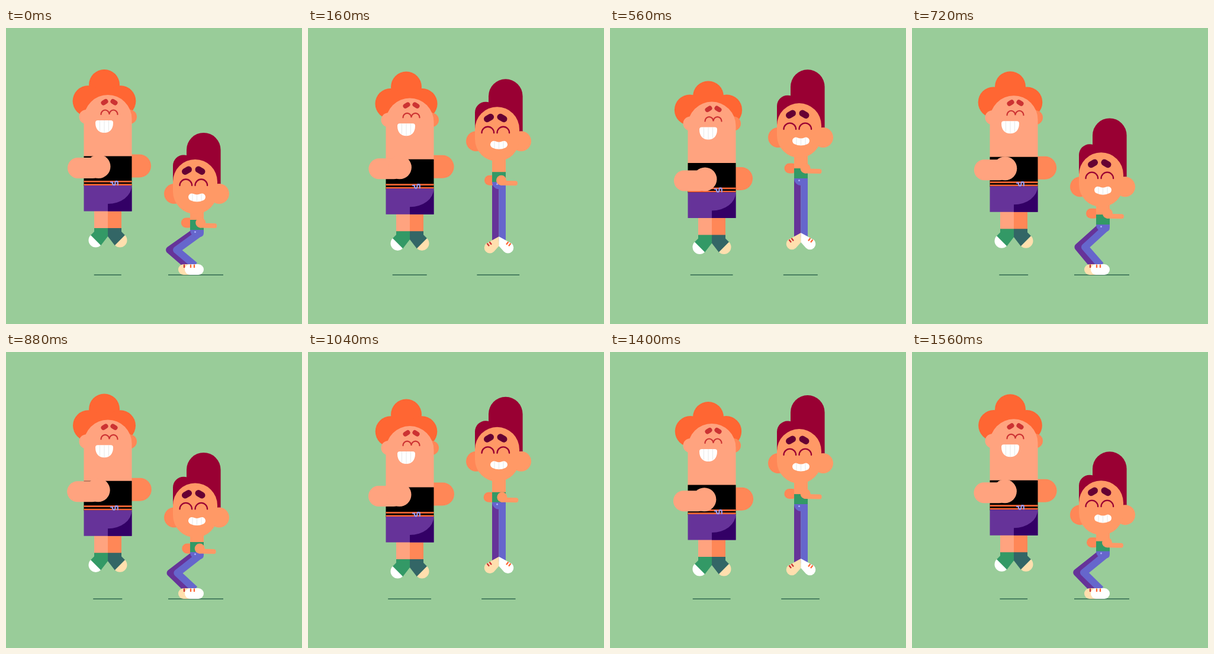
Animation of 500 by 500 pixels, one loop 1600 ms. Source, as an HTML page without scripts:

```html
<!DOCTYPE html>
<html lang="en">
<head>
<meta charset="utf-8">
<title>Jumping friends</title>
<style>
  @property --air  { syntax: "<number>"; inherits: true; initial-value: 0; }
  @property --down { syntax: "<number>"; inherits: true; initial-value: 0; }
  @property --sq   { syntax: "<number>"; inherits: true; initial-value: 0; }
  @property --nod  { syntax: "<number>"; inherits: true; initial-value: 0; }
  @property --lag  { syntax: "<number>"; inherits: true; initial-value: 0; }
  @property --arm  { syntax: "<number>"; inherits: true; initial-value: 0; }

  html, body { margin: 0; width: 100%; height: 100%; overflow: hidden; background: #9c9; }
  svg { display: block; width: 500px; height: 500px; }

  .guy {
    --delay: 0s; --base: 0; --sink: 0;
    animation: air .8s infinite, land .8s linear infinite, drag .8s linear infinite, swing .8s linear infinite;
    animation-delay: var(--delay);
  }
  .big   { --drop: 78; --skin: #ffa37f; --shade: #ff8757; }
  .small { --drop: 83.3; --delay: -.4s; --base: -1.3; --sink: 5; --skin: #f96; --shade: #ff8757; }

  .body { transform: translateY(calc((var(--base) + var(--air) + var(--sq) + var(--down) * var(--drop)) * 1px)); }
  .head { transform: translateY(calc((var(--nod) + var(--down) * var(--sink)) * 1px)); }
  .hair { transform: translate(calc(var(--lag) * var(--dx, 0) * 1px), calc(var(--lag) * var(--dy, 1) * 1px)); }
  .arm  { transform: translate(calc(var(--arm) * var(--dx) * 1px), calc(var(--arm) * 1px)); }
  .flying   { opacity: calc(1 - var(--down)); }
  .standing { opacity: var(--down); }
  .shadow { fill: #0b4434; transform: scaleX(calc(.495 + .024 * var(--air) + .505 * var(--down))); }
  .skin { fill: var(--skin); }
  .shade { fill: var(--shade); }
  .line { fill: none; stroke-linecap: round; }
  .leg { fill: none; stroke-width: 12; stroke-linejoin: round; animation: .8s linear infinite var(--delay); }
  .back { stroke: #639; animation-name: back; }
  .front { stroke: #66c; animation-name: front; }

  /* quadratic hang time around the top of the jump */
  @keyframes air {
    0% { --air: 0; animation-timing-function: cubic-bezier(.333, 0, .667, .333); }
    39.8% { --air: 21; animation-timing-function: step-end; }
    39.81%, 64.8% { --air: 0; animation-timing-function: step-end; }
    64.81% { --air: 16; animation-timing-function: cubic-bezier(.333, .667, .667, 1); }
    100% { --air: 0; }
  }
  @keyframes land {
    0%, 39.8% { --down: 0; --sq: 0; --nod: 0; }
    39.81% { --down: 1; }
    40% { --sq: 0; --nod: 0; }
    45% { --sq: 4.5; --nod: 2.5; }
    50% { --sq: 9; --nod: 3; }
    55% { --sq: 8; }
    60% { --sq: 6; --nod: 5.5; }
    64.8% { --down: 1; --sq: 5; --nod: 5.5; }
    64.81%, 100% { --down: 0; --sq: 0; --nod: 0; }
  }
  @keyframes drag {
    0%, 100% { --lag: 3; }
    20% { --lag: 1.2; }
    40% { --lag: 0; }
    45% { --lag: 9; }
    50% { --lag: 13; }
    55% { --lag: 9; }
    60% { --lag: 6.3; }
    65%, 70% { --lag: 11; }
    80% { --lag: 7; }
    90% { --lag: 5; }
  }
  @keyframes swing {
    0%, 100% { --arm: 0; }
    20% { --arm: -4; }
    30% { --arm: -5; }
    40% { --arm: -6; }
    45% { --arm: -2; }
    50% { --arm: 1; }
    60% { --arm: 7; }
    65%, 70% { --arm: 10; }
    80% { --arm: 4.5; }
    90% { --arm: 2; }
  }
  @keyframes back {
    0%, 40%, 80%, 100% { d: path("M317 337L280.5 370L306 401"); }
    50% { d: path("M317 346L276 375L306 401"); }
  }
  @keyframes front {
    0%, 40%, 80%, 100% { d: path("M328 337L292 370L319 401"); }
    50% { d: path("M328 346L288 375L319 401"); }
  }
</style>
</head>
<body>
<svg viewBox="0 0 500 500">
  <rect width="500" height="500" fill="#9c9"/>

  <g class="guy big">
    <rect class="shadow" x="125" y="416.5" width="93" height="1.1" style="transform-origin:172px 0"/>

    <g class="standing">
      <circle cx="172" cy="404" r="13" fill="#366"/>
      <path class="shade" d="M171 380h24l-2 15a12 12 0 0 1-24 0z"/>
      <circle cx="149" cy="404" r="13" fill="#396"/>
      <path class="skin" d="M149 380h23l-2.500 14a12 12 0 0 1-24 0z"/>
      <rect x="171.500" y="405" width="24" height="12" rx="6" fill="#ffdfae"/>
      <rect x="148.500" y="405" width="24" height="12" rx="6" fill="#fff"/>
    </g>

    <g class="body">
      <g class="flying">
        <path class="skin" d="M149 300h23v40h-23z"/>
        <path class="shade" d="M172 300h23v40h-23z"/>
        <path d="M149 338h23v14l-12 15.500-17-17.500 6-6z" fill="#396"/>
        <path d="M143 350a12 12 0 0 0 17 17z" fill="#fff"/>
        <path d="M195 338h-23v14l12 15.500 17-17.500-6-6z" fill="#366"/>
        <path d="M201 350a12 12 0 0 1-17 17z" fill="#ffdfae"/>
      </g>

      <g class="arm" style="--dx:-.4"><rect class="shade" x="190" y="213.500" width="55" height="39" rx="19.500"/></g>

      <g class="head">
        <g fill="#f63">
          <circle class="hair" cx="166" cy="93" r="26"/>
          <circle class="hair" cx="140" cy="122" r="26" style="--dx:-.47;--dy:.45"/>
          <circle class="hair" cx="192" cy="122" r="26" style="--dx:.47;--dy:.45"/>
        </g>
        <circle class="shade" cx="209" cy="150" r="12"/>
        <circle class="skin" cx="135.500" cy="150" r="12"/>
        <path class="skin" d="M131.500 222V153.500a40.500 40.500 0 0 1 81 0V222z"/>
        <g class="line" stroke="#c33">
          <path d="M164.500 126.500l4-2.500M180.500 124l4 2.500" stroke-width="8"/>
          <path d="M160.500 146a7 7.500 0 0 1 14 0a7 7.500 0 0 1 14 0" stroke-width="2.200"/>
        </g>
        <path d="M155 156h22q4 0 4 4c0 11-6 17-15 17s-15-6-15-17q0-4 4-4z" fill="#fff"/>
        <path d="M158.500 156v18M166 156v21M173.500 156v18" stroke="#ddd" stroke-width=".7"/>
      </g>

      <path d="M131.500 216.500h81V267h-81z"/>
      <path d="M131.500 259.300h81M131.500 264.700h81" stroke="#f63" stroke-width="2.700"/>
      <path d="M131.500 266h81v43.500h-81z" fill="#639"/>
      <path d="M212.500 266v43.500H172V297a40.500 31 0 0 0 40.500-31z" fill="#306"/>
      <path class="line" d="M177 260.500h3v2.500a2.200 2.200 0 0 0 4.400 0v-2a2.200 2.200 0 0 1 4.400 0v4" stroke="#99e" stroke-width="2.300"/>

      <g class="arm skin" style="--dx:.4">
        <rect x="104" y="219" width="60" height="35" rx="17.500"/>
        <circle cx="156.500" cy="234" r="20"/>
      </g>
    </g>
  </g>

  <g class="guy small">
    <rect class="shadow" x="274" y="416.500" width="93" height="1.100" style="transform-origin:324px 0"/>

    <g class="standing">
      <path class="leg back" d="M317 346L276 375L306 401"/>
      <path class="leg front" d="M328 346L288 375L319 401"/>
      <rect x="291" y="399" width="30" height="18" rx="9" fill="#ffdfae"/>
      <path d="M301 399.500v5.500" stroke="#c33" stroke-width="2.300"/>
      <rect x="302" y="399" width="32" height="18" rx="9" fill="#fff"/>
      <path d="M312 399.500v5.500M318 399.500v5.500" stroke="#f63" stroke-width="2.300"/>
    </g>

    <g class="body">
      <g class="flying">
        <path d="M311 250h11.500v100H311z" fill="#639"/>
        <path d="M322.500 250H334v100h-11.500z" fill="#66c"/>
        <path d="M322.500 342L300.500 354A9.500 9.500 0 0 0 314 367.500L322.500 358z" fill="#ffdfae"/>
        <path d="M322.500 342L344.500 354A9.500 9.500 0 0 1 331 367.500L322.500 358z" fill="#fff"/>
        <path d="M302.500 353.500l3.500 4.500M306.500 351l3.500 4.500" stroke="#c33" stroke-width="2.300"/>
        <path d="M342.500 353.500l-3.500 4.500M338.500 351l-3.500 4.500" stroke="#f63" stroke-width="2.300"/>
      </g>

      <g class="arm" style="--dx:.25"><rect class="shade" x="295.500" y="228.500" width="22" height="17" rx="8.500"/></g>
      <path class="skin" d="M311 195h23v40h-23z"/>
      <path d="M311 233h23v17.500h-23z" fill="#396"/>
      <path d="M311 250h23v5q0 7-7 7h-4.500a11.500 12 0 0 1-11.500-12z" fill="#66c"/>
      <circle cx="319.500" cy="253.500" r="1.500" fill="#aaf"/>
      <g class="arm" style="--dx:-.25">
        <circle class="skin" cx="329" cy="237" r="8.500"/>
        <path class="line" d="M329 241.500l23.500.5" stroke="#f96" stroke-width="8"/>
      </g>

      <g class="head">
        <g fill="#903">
          <path class="hair" d="M305 164V94a28.800 29 0 0 1 57.600 0v70z"/>
          <path class="hair" d="M282 159V127a18 18 0 0 1 36 0v32z" style="--dy:.5"/>
        </g>
        <circle class="shade" cx="284" cy="181" r="17"/>
        <circle class="skin" cx="360" cy="181" r="17"/>
        <rect class="skin" x="282" y="123" width="75" height="92" rx="37.500"/>
        <path class="line" d="M302.500 143.500l6-3.500M325 140l6 3.500" stroke="#603" stroke-width="11"/>
        <path class="line" d="M293.500 167a10.300 10.500 0 0 1 20.600 0M319.500 167a10.300 10.500 0 0 1 20.600 0" stroke="#903" stroke-width="2.300"/>
        <path class="line" d="M314 186.500q8.500 4 17 0" stroke="#fff" stroke-width="12"/>
        <path d="M315 181v12M322.500 182.500v12M330 181v12" stroke="#ddd" stroke-width=".7"/>
      </g>
    </g>
  </g>
</svg>
</body>
</html>
```
